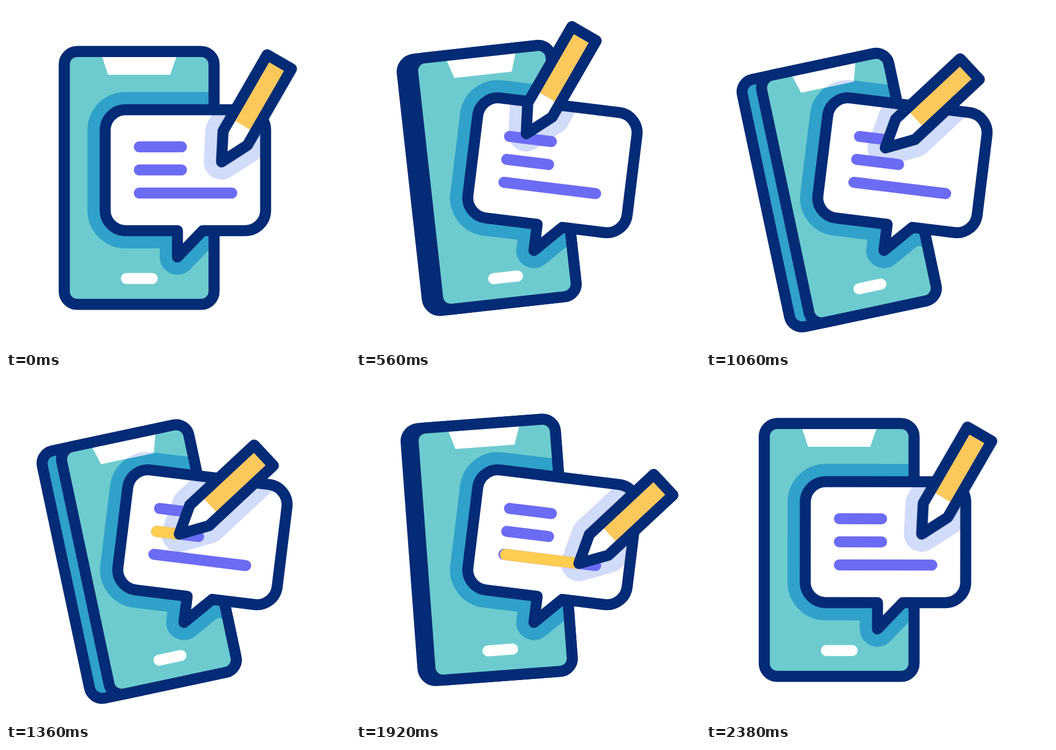
An HTML page that plays this animation: 640 by 640 pixels, repeating every 2400 ms.

```html
<!DOCTYPE html>
<html lang="en">
<head>
<meta charset="utf-8">
<title>Writing a message</title>
<style>
@property --a { syntax: "<length>"; inherits: false; initial-value: 0px; }
@property --b { syntax: "<length>"; inherits: false; initial-value: 0px; }

html, body { margin: 0; width: 100%; height: 100%; overflow: hidden; background: #fff; }
svg { display: block; width: 100vw; height: 100vh; }

.phone, .front, .face, .bubble, .pencil, .mark {
  animation-duration: 2.4s;
  animation-iteration-count: infinite;
  animation-timing-function: cubic-bezier(.364, 0, .636, 1);
}

.line { fill: none; stroke: #042b76; stroke-width: 20.5; stroke-linejoin: round; }
.halo { stroke-width: 66; stroke-linejoin: round; }
.blue { fill: #30a1ca; stroke: #30a1ca; }
.pale { fill: #d1dbfa; stroke: #d1dbfa; }

/* phone: tilts, sinks, and its face narrows to show the side */
.phone, .front, .face { transform-origin: 247.75px 319.75px; }
.phone { animation-name: tilt, sink; }
.front { animation-name: tilt, sink, narrow; }
.face { animation-name: tilt, sink, squeeze; }
@keyframes tilt {
  0%, 7.5%, 92.5%, 100% { rotate: 0deg; }
  38.2%, 61.8% { rotate: -12deg; }
}
@keyframes sink {
  0%, 25%, 75%, 100% { translate: 0 0; }
  50% { translate: 0 26px; }
}
@keyframes narrow {
  0%, 7.5%, 92.5%, 100% { x: 108.5px; width: 278.5px; }
  38.2%, 61.8% { x: 145.5px; width: 241.5px; }
}
@keyframes squeeze {
  0%, 7.5%, 92.5%, 100% { transform: translateX(0px) scaleX(1); }
  38.2%, 61.8% { transform: translateX(18.5px) scaleX(.867); }
}

.bubble { transform-origin: 425px 560px; animation-name: lean; }
@keyframes lean {
  0%, 1.25%, 100% { rotate: 0deg; }
  15.4%, 84.4% { rotate: 7deg; }
}

/* the pencil's tip is its own zero point */
.pencil { transform-origin: 0 0; animation-name: write; }
@keyframes write {
  0%, 1.25%, 100% { translate: 401px 290px; rotate: 30deg; }
  15% { translate: 388px 226px; rotate: 30deg; }
  28.33% { translate: 285.6px 242.7px; rotate: 30deg; }
  39.8% { translate: 363px 252.2px; rotate: 47deg; }
  50.6% { translate: 280.4px 285.4px; rotate: 47deg; }
  62.2% { translate: 357.8px 294.9px; rotate: 47deg; }
  70.6% { translate: 275.2px 328.1px; rotate: 47deg; }
  83.75% { translate: 446px 349px; rotate: 47deg; }
}

/* highlight from --a to --b along a text line */
.mark {
  fill: #ffcd4f;
  x: calc(237.5px + var(--a));
  width: calc(21px + var(--b) - var(--a));
}
.m1 { animation-name: mark1; }
.m2 { animation-name: mark2; }
.m3 { animation-name: mark3; }
@keyframes mark1 {
  0%, 28.33% { --b: 0px; opacity: 0; }
  28.34% { opacity: 1; }
  0%, 36.7% { --a: 0px; }
  39.8%, 100% { --b: 78px; }
  48.75%, 100% { --a: 78px; }
  48.75% { opacity: 1; }
  48.76%, 100% { opacity: 0; }
}
@keyframes mark2 {
  0%, 50.6% { --b: 0px; opacity: 0; }
  50.61% { opacity: 1; }
  0%, 60% { --a: 0px; }
  62.2%, 100% { --b: 78px; }
  72.9%, 100% { --a: 78px; }
  72.9% { opacity: 1; }
  72.91%, 100% { opacity: 0; }
}
@keyframes mark3 {
  0%, 70.6% { --b: 0px; opacity: 0; }
  70.61% { opacity: 1; }
  0%, 78.9% { --a: 0px; }
  83.75%, 100% { --b: 172px; }
  92%, 100% { --a: 172px; }
  92% { opacity: 1; }
  92.01%, 100% { opacity: 0; }
}
</style>
</head>
<body>
<svg viewBox="0 0 640 640">
  <defs>
    <path id="balloon" d="M222.5 193H445a38 38 0 0 1 38 38V380a38 38 0 0 1-38 38H366L319 467V418H222.5a38 38 0 0 1-38-38V231a38 38 0 0 1 38-38z"/>
    <path id="pen" d="M0 0L-26.2-51V-215H26.2V-51z"/>
    <clipPath id="screen"><rect class="front" x="108.5" y="84.7" width="278.5" height="470.3" rx="24"/></clipPath>
    <clipPath id="notch"><path class="face" d="M177 89H319L305.5 128H190z"/></clipPath>
    <clipPath id="paper"><use href="#balloon" class="bubble"/></clipPath>
  </defs>

  <rect class="phone" x="108.5" y="84.7" width="278.5" height="470.3" rx="24" fill="#30a1ca"/>
  <rect class="phone line" x="108.5" y="84.7" width="278.5" height="470.3" rx="24"/>
  <rect class="front" x="108.5" y="84.7" width="278.5" height="470.3" rx="24" fill="#6dcbcf"/>
  <g clip-path="url(#screen)"><use href="#balloon" class="bubble halo blue"/></g>
  <path class="face" d="M177 89H319L305.5 128H190z" fill="#fff"/>
  <g clip-path="url(#notch)"><use href="#balloon" class="bubble halo pale"/></g>
  <path class="face" d="M224 507H272" stroke="#fff" stroke-width="20.5" stroke-linecap="round" vector-effect="non-scaling-stroke"/>
  <rect class="front line" x="108.5" y="84.7" width="278.5" height="470.3" rx="24"/>

  <use href="#balloon" class="bubble" fill="#fff"/>
  <g clip-path="url(#paper)"><use href="#pen" class="pencil halo pale"/></g>
  <g class="bubble">
    <path d="M248 262H326.5M248 305H326.5M248 348H420" stroke="#6c6bf3" stroke-width="20.5" stroke-linecap="round"/>
    <rect class="mark m1" y="251.5" height="21" rx="10.5"/>
    <rect class="mark m2" y="294.5" height="21" rx="10.5"/>
    <rect class="mark m3" y="337.5" height="21" rx="10.5"/>
    <use href="#balloon" class="line"/>
  </g>

  <g class="pencil">
    <use href="#pen" fill="#fff"/>
    <path d="M-26.2-78.5V-215H26.2V-78.5z" fill="#fbc85c"/>
    <use href="#pen" class="line"/>
  </g>
</svg>
</body>
</html>
```
